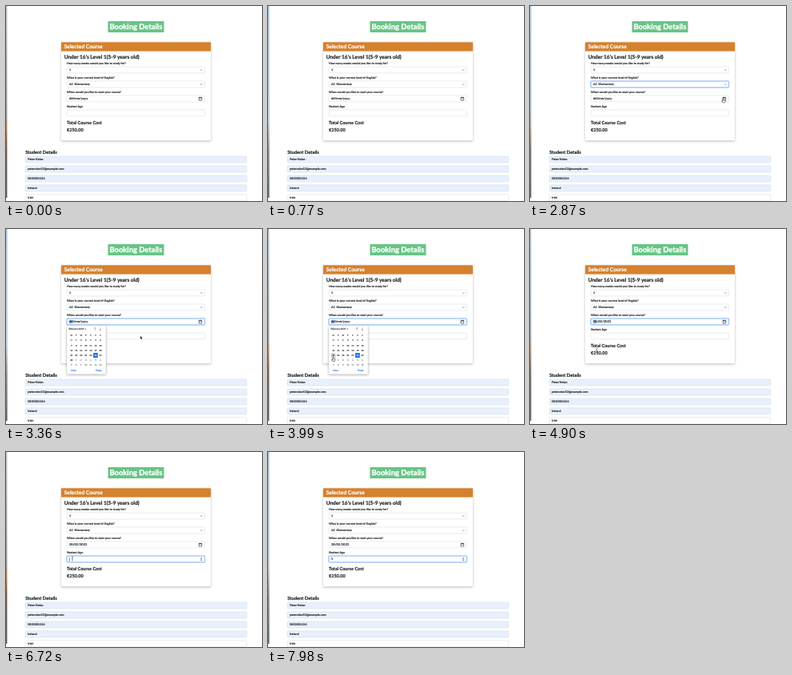
These frames come from a looping animation (320x244 px, 8000 ms). An HTML page:

```html
<!DOCTYPE html>
<html lang="en">
<head>
<meta charset="utf-8">
<title>Booking Details</title>
<style>
  html, body { margin: 0; height: 100%; overflow: hidden; background: #fff; }
  svg { display: block; width: 100vw; height: 100vh; }
  text { font-family: Lato, "Open Sans", sans-serif; font-weight: 700; stroke: currentColor; stroke-width: .03em; fill: currentColor; text-rendering: geometricPrecision; }
  .card { filter: drop-shadow(0 1px 1.5px rgba(0, 0, 0, .28)); }
</style>
</head>
<body>
<svg id="stage" viewBox="0 0 320 244" preserveAspectRatio="none">
  <defs>
    <linearGradient id="warm" x1="0" y1="0" x2="0" y2="1">
      <stop offset="0" stop-color="#b9c0c5"/><stop offset=".55" stop-color="#8f979b"/>
      <stop offset=".64" stop-color="#b07a50"/><stop offset=".75" stop-color="#6a5a50"/>
      <stop offset="1" stop-color="#4f5a66"/>
    </linearGradient>
    <linearGradient id="blue" x1="0" y1="0" x2="0" y2="1">
      <stop offset="0" stop-color="#a9c6e0"/><stop offset=".6" stop-color="#c3d3df"/>
      <stop offset=".75" stop-color="#8a948c"/><stop offset="1" stop-color="#5f6a70"/>
    </linearGradient>
  </defs>
</svg>
<script>
const stage = document.getElementById('stage');
const INK = '#212529', BLUE = '#1a73e8';

const text = (x, y, size, str, color = INK, extra = '') =>
  `<text x="${x}" y="${y}" font-size="${size}" style="color:${color}" ${extra}>${str}</text>`;
const rect = (x, y, w, h, fill, extra = '') =>
  `<rect x="${x}" y="${y}" width="${w}" height="${h}" fill="${fill}" ${extra}/>`;
const line = (d, color, width) =>
  `<path d="${d}" fill="none" stroke="${color}" stroke-width="${width}"/>`;
const group = (id, body) => `<g id="${id}">${body}</g>`;

const fieldY = [76, 94, 112, 130];
const labels = ['How many weeks would you like to study for?', 'What is your current level of English?',
  'When would you like to start your course?', 'Student Age'];
const field = y => rect(76, y, 172.5, 7.9, '#fff', 'rx="1" stroke="#d3d8dd" stroke-width=".5"');
const focusRing = y => rect(76, y, 172.5, 7.9, 'none', 'rx="1" stroke="#0d6efd" stroke-opacity=".22" stroke-width="1.5"') +
  rect(76, y, 172.5, 7.9, 'none', 'rx="1" stroke="#86b7fe" stroke-width=".5"');
const chevron = y => line(`M243.2 ${y - .5}l1.1 1.1l1.1 -1.1`, '#444', .6);

function calendar() {
  const col = i => 81.7 + i * 6.05, row = i => 140.4 + i * 6.15;
  const mid = 'text-anchor="middle"';
  let s = rect(76, 120.7, 49, 61, '#fff', 'rx="1" stroke="#ccc" stroke-width=".4" class="card"');
  s += text(78.5, 126.4, 2.9, 'February 2022') + '<path d="M98.6 124.7h1.8l-.9 1.2z" fill="#333"/>';
  s += line('M111.2 127v-3.6m-1.3 1.3l1.3 -1.3l1.3 1.3M118 123.4v3.6m-1.3 -1.3l1.3 1.3l1.3 -1.3', '#555', .4);
  [...'MTWTFSS'].forEach((d, i) => s += text(col(i), 133.9, 2.6, d, '#333', mid));
  s += group('hover', rect(78.8, 155.2, 5.8, 6, '#c9d3df', 'rx=".5"'));
  s += rect(0, 0, 5.8, 6, BLUE, 'id="picked" rx=".5"');
  for (let i = 0; i < 42; i++) {
    const day = i < 1 ? 31 : i < 29 ? i : i - 28;
    const other = i < 1 || i > 28;
    s += text(col(i % 7), row(Math.floor(i / 7)), 2.7, day, other ? '#777' : INK, `${mid} id="cell${i}"`);
  }
  return s + text(81, 178, 2.9, 'Clear', BLUE) + text(112, 178, 2.9, 'Today', BLUE);
}

const rows = ['Peter Nolan', 'petenolan52@example.com', '0830001234', 'Ireland', 'Irish'];

stage.innerHTML += rect(0, 0, 1.4, 240, 'url(#warm)') + rect(0, 0, 1.4, 240, 'url(#blue)', 'id="slide"') +
  rect(127.5, 19, 70, 14, '#68c486') + text(129.4, 29.3, 9.4, 'Booking Details', '#fff') +
  rect(69, 45.3, 187, 122.9, '#fff', 'rx="1" class="card"') +
  rect(69, 45.3, 187, 11.3, '#d5812e') + text(72.7, 53.4, 6.7, 'Selected Course', '#fff') +
  text(72.7, 66.3, 6.5, 'Under 16\'s Level 1(5-9 years old)') +
  labels.map((s, i) => text(76, fieldY[i] - 3.1, 3.65, s) + field(fieldY[i])).join('') +
  text(79, 81.3, 3.75, '1') + text(79, 99.3, 3.75, 'A2 -Elementary') + chevron(80) + chevron(98) +
  group('ring1', focusRing(94)) + group('ring2', focusRing(112)) + group('ring3', focusRing(130)) +
  rect(78.8, 113.8, 4.4, 4.6, '#9cc3f5', 'id="mark"') +
  text(79, 117.4, 4, 'dd/mm/yyyy', INK, 'id="date"') +
  line('M241.1 114.5h3.6v3.5h-3.6zM241.1 115h3.6M241.9 113.7v1M243.9 113.7v1', '#222', .6) +
  group('age', text(79, 135.4, 3.75, '5')) + group('caret', line('M79.5 132v4.6', '#333', .5)) +
  group('spin', '<path d="M242.9 133.6l1.2 -1.5l1.2 1.5zM242.9 134.8l1.2 1.5l1.2 -1.5z" fill="#555"/>') +
  text(76, 147.5, 5.6, 'Total Course Cost') + text(76, 157.3, 5.6, '€250.00') +
  text(24.2, 184.7, 5.8, 'Student Details') +
  rows.map((s, i) => rect(24.2, 188 + i * 11.95, 276.6, 8.1, i < 4 ? '#e8f0fe' : '#fff',
    'rx="1" stroke="#d3d8dd" stroke-width=".5"') + text(27.2, 193.4 + i * 11.95, 3.7, s)).join('') +
  group('popup', calendar()) +
  group('cursor',
    group('arrow', '<path d="M0 0v4l1 -.9l.7 1.5l.7 -.3l-.7 -1.5h1.3z" fill="#000" stroke="#fff" stroke-width=".3"/>') +
    group('beam', line('M-1 -2.4q1 0 1 .7v3.6q0 .7 -1 .7M1 -2.4q-1 0 -1 .7v3.6q0 .7 1 .7', '#444', .4)) +
    group('hand', '<path d="M-.5 .3q.5 -.6 1 0v1.7l2 .4v1.7l-.7 1.3h-2.2l-1.6 -2q.2 -.8 1 -.2l.5 .4z" fill="#fff" stroke="#000" stroke-width=".5"/>'));

const el = id => document.getElementById(id);
const show = (id, on) => el(id).setAttribute('visibility', on ? 'inherit' : 'hidden');
const clamp = v => Math.max(0, Math.min(1, v));

// Cursor path: time, x, y
const path = [[910, 128.5, 63.5], [1050, 128.5, 63.5], [1330, 142, 122.5], [1820, 142, 122.5], [2030, 165, 98],
  [2310, 241.5, 115.5], [3080, 241.5, 115.5], [3640, 95, 152], [3920, 81.4, 160.3], [4690, 81.4, 160.3],
  [4900, 83.5, 152], [5600, 83.5, 152], [5810, 83, 133.2], [8000, 83, 133.2]];
const fades = [0, 1540, 2520, 3360, 4690, 5600, 6720, 7910];

function cursorAt(t) {
  const i = path.findIndex(p => p[0] > t);
  if (i < 1) return path[0].slice(1);
  const [a, b] = [path[i - 1], path[i]];
  let k = (t - a[0]) / (b[0] - a[0]);
  k = k * k * (3 - 2 * k);
  return [a[1] + (b[1] - a[1]) * k, a[2] + (b[2] - a[2]) * k];
}

function draw(t) {
  const open = t >= 3010 && t < 4690, chosen = t >= 4480, dateFocus = t >= 2940 && t < 5880;
  const ageFocus = t >= 5880, typed = t >= 7770;

  // The two slides at the left edge fade into each other in turn
  const n = fades.filter(f => f <= t).length;
  const k = clamp((t - fades[n - 1]) / 770);
  el('slide').setAttribute('opacity', n % 2 ? k : 1 - k);

  show('ring1', t >= 2030 && t < 2940);
  show('ring2', dateFocus);
  show('mark', dateFocus);
  show('ring3', ageFocus);
  show('spin', ageFocus);
  show('caret', ageFocus && !typed);
  show('age', typed);
  el('date').textContent = t >= 4690 ? '28/02/2022' : 'dd/mm/yyyy';

  show('popup', open);
  show('hover', open && t >= 3850 && !chosen);
  el('picked').setAttribute('x', chosen ? 78.8 : 109.05);
  el('picked').setAttribute('y', chosen ? 161.2 : 155.1);
  el('cell26').style.color = chosen ? INK : '#fff';
  el('cell28').style.color = chosen ? '#fff' : INK;

  const [x, y] = cursorAt(t);
  const beam = t < 1100 || t >= 4690;
  const hand = t >= 2240 && t < 3150 || t >= 3850 && t < 4690;
  el('cursor').setAttribute('transform', `translate(${x} ${y})`);
  show('cursor', t >= 910 && !typed);
  show('beam', beam);
  show('hand', hand);
  show('arrow', !beam && !hand);
}

const start = performance.now();
function tick() {
  draw((performance.now() - start) % 8000);
  requestAnimationFrame(tick);
}
tick();
</script>
</body>
</html>
```
